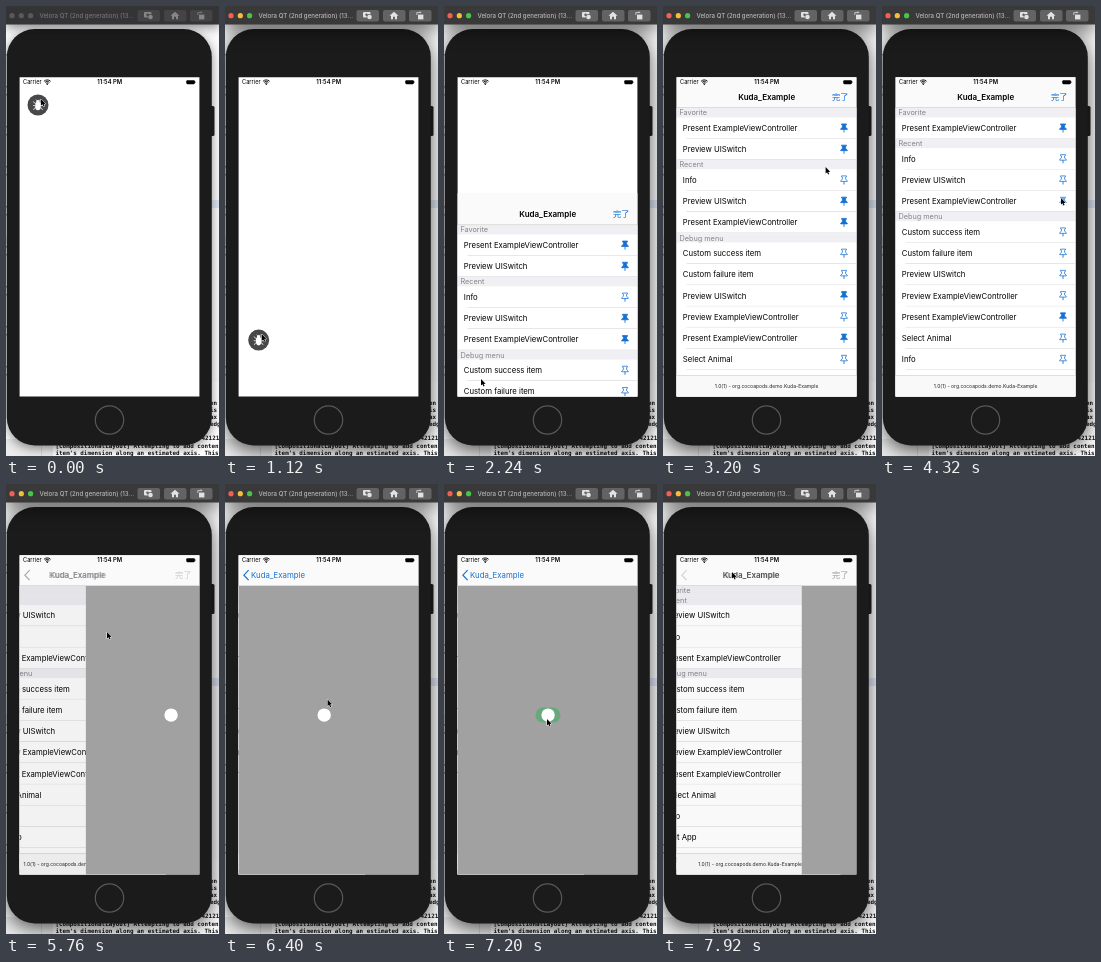
Recreate the animation shown at these times as an HTML page with a canvas. Size 213 by 450 pixels, loop 8000 ms.

```html
<!DOCTYPE html>
<html lang="en">
<head>
<meta charset="utf-8">
<style>
html, body { margin: 0; width: 100%; height: 100%; overflow: hidden; background: #fff; }
canvas { display: block; width: 213px; height: 450px; }
</style>
</head>
<body>
<canvas id="stage"></canvas>
<script>
const W = 213, H = 450, LOOP = 8000;
const canvas = document.getElementById('stage');
const ctx = canvas.getContext('2d');
const dpr = window.devicePixelRatio || 1;
canvas.width = W * dpr;
canvas.height = H * dpr;

const SANS = 'Inter, "Liberation Sans", sans-serif';
const MONO = '"DejaVu Sans Mono", monospace';
const CJK = '"Noto Sans CJK JP", "Noto Sans CJK", sans-serif';
const BLUE = '#1670d2', GREY = '#a1a1a1';
const SCREEN = { x: 13.6, y: 71.2, w: 179.8, h: 319.4 };
const NAV_BOTTOM = 102, ROW = 21.24, HEAD = 9.5;

// Event times in ms
const T = { focus: 300, drop: 1400, present: 2122, unpin1: 3700, unpin2: 4400,
  push: 5642, toggle: 7110, pop: 7788 };

const CURSOR = [[0, 35, 93], [300, 35, 93], [1400, 37, 373], [2550, 37, 373], [3200, 162.6, 161],
  [3550, 179, 192], [4600, 179, 192], [5250, 101, 148], [5950, 101, 148], [6600, 103, 235],
  [7250, 103, 235], [7680, 69, 88], [LOOP, 69, 88]];

const clamp = v => Math.max(0, Math.min(1, v));
const mix = (a, b, p) => a + (b - a) * p;
const smooth = p => p * p * (3 - 2 * p);
const ramp = (t, start, len) => smooth(clamp((t - start) / len));

// Critically damped spring, 0 to 1
function spring(t, start) {
  const x = Math.max(0, t - start) * 0.0181;
  return 1 - (1 + x) * Math.exp(-x);
}

function cursorAt(t) {
  let i = 1;
  while (CURSOR[i][0] < t) i++;
  const [t0, x0, y0] = CURSOR[i - 1], [t1, x1, y1] = CURSOR[i];
  const p = smooth(clamp((t - t0) / (t1 - t0)));
  return [mix(x0, x1, p), mix(y0, y1, p)];
}

function rect(x, y, w, h, fill) {
  ctx.fillStyle = fill;
  ctx.fillRect(x, y, w, h);
}
function round(x, y, w, h, r, fill) {
  ctx.beginPath();
  ctx.roundRect(x, y, w, h, r);
  ctx.fillStyle = fill;
  ctx.fill();
}
function disc(x, y, r, fill) {
  ctx.beginPath();
  ctx.arc(x, y, r, 0, 7);
  ctx.fillStyle = fill;
  ctx.fill();
}
function text(s, x, y, size, fill = '#000', { weight = 400, align = 'left', font = SANS } = {}) {
  ctx.font = `${weight} ${size}px ${font}`;
  ctx.textAlign = align;
  ctx.textBaseline = 'alphabetic';
  ctx.fillStyle = fill;
  ctx.fillText(s, x, y + size * 0.36);
}
function stroke(points, color, width) {
  ctx.beginPath();
  points.forEach(([x, y]) => ctx.lineTo(x, y));
  ctx.strokeStyle = color;
  ctx.lineWidth = width;
  ctx.stroke();
}
function at(x, y, draw) {
  ctx.save();
  ctx.translate(x, y);
  draw();
  ctx.restore();
}
function faded(alpha, draw) {
  ctx.save();
  ctx.globalAlpha *= alpha;
  draw();
  ctx.restore();
}
function clipped(x, y, w, h, draw) {
  ctx.save();
  ctx.beginPath();
  ctx.rect(x, y, w, h);
  ctx.clip();
  draw();
  ctx.restore();
}
function shadowed(active, draw) {
  ctx.save();
  ctx.shadowColor = `rgba(0,0,0,${active ? 0.65 : 0.45})`;
  ctx.shadowBlur = (active ? 19 : 11) * dpr;
  ctx.shadowOffsetY = (active ? 5 : 3) * dpr;
  draw();
  ctx.restore();
}

function drawDesktop() {
  rect(0, 0, W, H, '#fbfbfb');
  rect(204, 194, 9, 8, '#dfe6f6');
  rect(0, 230, 2, 8, '#dfe6f6');
  for (let y = 48; y < 370; y += 8) if (y * 7 % 5 < 2) rect(0, y, 1.5, 1.5, '#999');
  rect(0, 376, W, 74, '#fff');
  rect(0, 433, 47, 17, '#ececec');
  rect(35, 433, 0.6, 17, '#c8c8c8');
}

function drawConsole() {
  const line = (s, x, y) => text(s, x, y, 5.9, '#111', { weight: 700, font: MONO });
  ['en', 'is', 'ax', 'edg'].forEach((s, i) => line(s, 204, 397 + i * 7.1));
  line('42121', 195.5, 432.2);
  line('[CompositionalLayout] Attempting to add conten', 49.5, 439.5);
  line("item's dimension along an estimated axis. This", 49.5, 446.7);
}

function drawTitleBar(active) {
  shadowed(active, () => rect(0, 0, W, 18.5, active ? '#3a393a' : '#343335'));
  const lights = active ? ['#f45e55', '#f5bd3b', '#45c645'] : ['#59585a', '#59585a', '#59585a'];
  lights.forEach((c, i) => disc(6 + i * 9.3, 9.7, 2.6, c));
  text('Velora QT (2nd generation) (13…', 33.5, 9.7, 6.1, active ? '#b9b8b9' : '#767577', { weight: 500 });
  const ink = active ? '#e2e2e2' : '#868686', face = active ? '#636264' : '#444345';
  [131.5, 158, 184].forEach(x => round(x, 4, 22.5, 11.5, 2, face));
  // Camera
  round(138, 6, 7.5, 5.5, 1, ink);
  disc(144.5, 11, 2.9, face);
  disc(144.5, 11, 2.3, ink);
  disc(141.5, 8.7, 1.2, face);
  // Home
  at(169, 9.7, () => {
    ctx.beginPath();
    [[-4.5, 0], [0, -4], [4.5, 0], [3, 0], [3, 3.6], [1, 3.6], [1, 1], [-1, 1], [-1, 3.6], [-3, 3.6], [-3, 0]]
      .forEach(p => ctx.lineTo(...p));
    ctx.fillStyle = ink;
    ctx.fill();
  });
  // Rotate
  rect(193, 8.6, 5.4, 4.8, ink);
  stroke([[191.8, 9], [191.8, 6.6], [196, 6.6], [194.8, 5.4]], ink, 0.8);
}

function drawPhone(active) {
  round(203, 100, 5.5, 30, 1.5, '#222');
  shadowed(active, () => round(0.8, 23, 205, 416.5, 28, '#1b1b1c'));
  ctx.beginPath();
  ctx.arc(103.5, 414, 14.2, 0, 7);
  ctx.strokeStyle = '#58585a';
  ctx.lineWidth = 1.2;
  ctx.stroke();
}

function drawStatus() {
  text('Carrier', 17, 76.3, 5.7);
  text('11:54 PM', 103.7, 76.3, 5.8, '#000', { weight: 600, align: 'center' });
  ctx.strokeStyle = '#000';
  ctx.lineWidth = 0.9;
  [1.6, 3.1, 4.6].forEach(r => {
    ctx.beginPath();
    ctx.arc(41.3, 78.5, r, -Math.PI * 0.76, -Math.PI * 0.24);
    ctx.stroke();
  });
  disc(41.3, 78.2, 0.7, '#000');
  round(180.3, 74.2, 8.6, 4, 1.1, '#000');
  rect(189.3, 75.4, 0.7, 1.6, '#777');
}

function drawPin(x, y, filled, alpha = 1) {
  at(x, y, () => {
    ctx.globalAlpha *= alpha;
    ctx.beginPath();
    [[-2.5, -4.2], [2.5, -4.2], [2.5, -3.3], [1.5, -2.8], [1.7, -0.7], [3.3, 0.6], [3.3, 1.3],
      [-3.3, 1.3], [-3.3, 0.6], [-1.7, -0.7], [-1.5, -2.8], [-2.5, -3.3]].forEach(p => ctx.lineTo(...p));
    ctx.closePath();
    ctx.fillStyle = ctx.strokeStyle = BLUE;
    ctx.lineWidth = 0.75;
    ctx.stroke();
    if (filled) ctx.fill();
    stroke([[0, 1.3], [0, 4.4]], BLUE, 0.9);
  });
}

function drawHeader(label, y) {
  rect(13, y, 181, HEAD, '#f0f0f4');
  text(label, 16.4, y + 4.7, 7.3, '#858588');
}

function drawRow(label, y, filled, last, pinAlpha) {
  rect(13, y, 181, ROW, '#fff');
  text(label, 19.8, y + ROW / 2, 7.74);
  drawPin(181, y + ROW / 2, filled, pinAlpha);
  rect(last ? 13 : 23.5, y + ROW - 0.5, 181, 0.5, '#c8c8cc');
}

function drawList(t) {
  const present = 'Present ExampleViewController', sw = 'Preview UISwitch';
  const gone1 = ramp(t, T.unpin1, 300), gone2 = ramp(t, T.unpin2, 300);
  const pinned = s => s === present ? t < T.unpin2 : s === sw && t < T.unpin1;
  const pressed = t > T.unpin2 - 130 && t < T.unpin2;
  let y = NAV_BOTTOM;

  rect(13, y, 181, 289, '#fff');
  drawHeader('Favorite', y);
  y += HEAD;
  const favHeight = (2 - gone1 - gone2) * ROW;
  clipped(13, y, 181, favHeight, () => {
    faded(1 - gone2, () => drawRow(present, y, true, gone1 === 1));
    if (gone1 < 1) faded(1 - gone1, () => drawRow(sw, y + ROW, true, true));
  });
  y += favHeight;

  const recent = t < T.push ? ['Info', sw, present] : [sw, 'Info', present];
  const debug = ['Custom success item', 'Custom failure item', sw, 'Preview ExampleViewController',
    present, 'Select Animal', 'Info', 'Exit App', 'Reset'];
  const section = (title, rows, isRecent) => {
    drawHeader(title, y);
    y += HEAD;
    rows.forEach((s, i) => {
      drawRow(s, y, pinned(s), i === rows.length - 1, isRecent && s === present && pressed ? 0.6 : 1);
      y += ROW;
    });
  };
  section('Recent', recent, true);
  section('Debug menu', debug, false);

  rect(13, 369.5, 181, 22, '#f9f9f9');
  rect(13, 369.2, 181, 0.5, '#c0c0c0');
  text('1.0(1) - org.cocoapods.demo.Kuda-Example', 103.6, 380, 5, '#222', { align: 'center' });
}

function drawNav(p) {
  rect(13, 70, 181, 32, '#fafafa');
  rect(13, NAV_BOTTOM - 0.5, 181, 0.5, '#bcbcbc');
  const x = mix(103.7, 53, p);
  const name = 'Kuda_Example';
  const moving = p > 0.02 && p < 0.98;
  const tint = moving ? '#777b80' : BLUE;
  if (p < 0.99) faded(1 - p, () => {
    text(name, x, 91, 8, '#000', { weight: 600, align: 'center' });
    text('完了', 185.5, 91, 8.2, tint, { weight: 500, align: 'right', font: CJK });
  });
  if (p > 0.01) faded(p, () => {
    text(name, x, 91, 7.8, tint, { align: 'center' });
    stroke([[23.6, 86.2], [18.9, 91.2], [23.6, 96.2]], tint, 1.2);
  });
}

function drawSwitchPage(t, offset) {
  at(offset, 0, () => {
    rect(14, NAV_BOTTOM, 180, 289, GREY);
    const on = ramp(t, T.toggle, 180);
    faded(on, () => round(91.5, 223.6, 25, 15, 7.5, '#2fae58'));
    disc(mix(99.2, 108.8, on), 231.1, 6.7, '#fff');
  });
}

function drawButton(t) {
  const p = ramp(t, T.focus, T.drop - T.focus);
  const snap = ramp(t, T.drop, 250);
  at(32 + 2 * p - 2 * snap, mix(99, 379, p) - 8 * snap, () => {
    disc(0, 0, 10.5, '#48484a');
    for (const side of [-1, 1]) {
      stroke([[0, -1], [side * 3.6, -2], [side * 4.6, -3.6]], '#fff', 0.7);
      stroke([[0, 0.6], [side * 5, 0.6]], '#fff', 0.7);
      stroke([[0, 2], [side * 3.6, 3.2], [side * 4.4, 5]], '#fff', 0.7);
      stroke([[0, -3], [side * 2, -5.6]], '#fff', 0.6);
    }
    ctx.beginPath();
    ctx.ellipse(0, 1, 2.8, 4.3, 0, 0, 7);
    ctx.fillStyle = '#fff';
    ctx.fill();
    disc(0, -3.3, 1.8, '#fff');
  });
}

function drawSheet(t) {
  const p = spring(t, T.push) - spring(t, T.pop);
  at(0, 320 * (1 - spring(t, T.present)), () => {
    at(-54 * p, 0, () => drawList(t));
    if (p > 0.001) {
      rect(13, NAV_BOTTOM, 181, 289, `rgba(0,0,0,${0.08 * p})`);
      drawSwitchPage(t, 180 * (1 - p));
    }
    drawNav(p);
  });
}

function drawCursor(t) {
  at(...cursorAt(t), () => {
    ctx.beginPath();
    [[0, 0], [0, 6.6], [1.5, 5.3], [2.5, 7.6], [3.6, 7.1], [2.6, 4.9], [4.6, 4.8]].forEach(p => ctx.lineTo(...p));
    ctx.closePath();
    ctx.strokeStyle = '#fff';
    ctx.lineWidth = 1;
    ctx.stroke();
    ctx.fillStyle = '#000';
    ctx.fill();
  });
}

function draw(t) {
  const active = t >= T.focus;
  ctx.setTransform(dpr, 0, 0, dpr, 0, 0);
  drawDesktop();
  drawConsole();
  drawPhone(active);
  drawTitleBar(active);
  clipped(SCREEN.x, SCREEN.y, SCREEN.w, SCREEN.h, () => {
    rect(13, 70, 182, 322, '#fff');
    drawButton(t);
    if (t > T.present) drawSheet(t);
    drawStatus();
  });
  drawCursor(t);
}

const start = performance.now();
function tick() {
  draw((performance.now() - start) % LOOP);
  requestAnimationFrame(tick);
}
draw(0);
requestAnimationFrame(tick);
</script>
</body>
</html>
```
